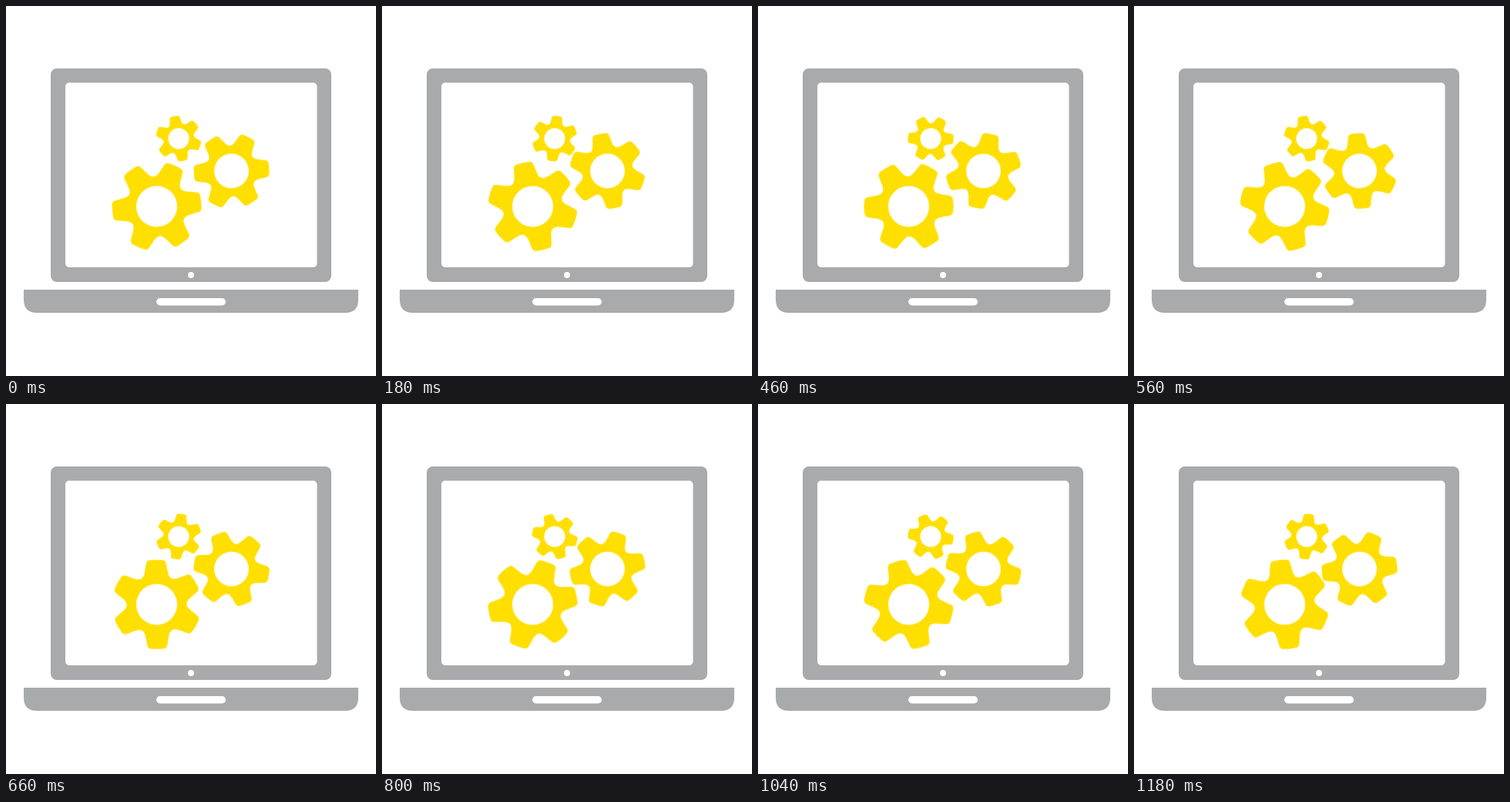
Animation of 480 by 480 pixels, one loop 1.2 s. Source, as an HTML page:

```html
<!DOCTYPE html>
<html lang="en">
<head>
<meta charset="utf-8">
<title>Laptop with turning gears</title>
<style>
  html, body { margin: 0; width: 100%; height: 100%; overflow: hidden; background: #fff; }
  svg { display: block; width: 100vw; height: 100vh; }
  .case { fill: #a8aaac; }
  .cut { fill: #fff; }
  .gear { fill: #ffdf00; animation: 1200ms linear infinite; }
  .large { animation-name: large; }
  .medium { animation-name: medium; }
  .small { animation-name: small; }

  @keyframes large {
    0% { transform: rotate(24deg); }
    15% { transform: rotate(47deg); }
    26.667% { transform: rotate(67.5deg); }
    38.333% { transform: rotate(88.5deg); }
    55% { transform: rotate(119deg); }
    76.667% { transform: rotate(156deg); }
    98.333%, 100% { transform: rotate(173.5deg); }
  }
  @keyframes medium {
    0% { transform: rotate(26.5deg); }
    15% { transform: rotate(-11deg); }
    26.667% { transform: rotate(-29deg); }
    38.333% { transform: rotate(-48.5deg); }
    55% { transform: rotate(-80.5deg); }
    76.667% { transform: rotate(-121deg); }
    98.333%, 100% { transform: rotate(-156deg); }
  }
  @keyframes small {
    0% { transform: rotate(-11deg); }
    15% { transform: rotate(6.5deg); }
    26.667% { transform: rotate(6deg); }
    38.333% { transform: rotate(31deg); }
    55% { transform: rotate(67deg); }
    76.667% { transform: rotate(133deg); }
    98.333%, 100% { transform: rotate(186deg); }
  }
</style>
</head>
<body>
<svg viewBox="0 0 480 480">
  <defs>
    <path id="tooth" d="M-19-33Q-15.5-37.5-14.9-42L-13-53Q-12.3-57-8-57.6Q0-58.2 8-57.6Q12.3-57 13-53L14.9-42Q15.5-37.5 19-33Z"/>
    <g id="gear">
      <circle r="32.75" fill="none" stroke="#ffdf00" stroke-width="12.5"/>
      <use href="#tooth"/>
      <use href="#tooth" transform="rotate(60)"/>
      <use href="#tooth" transform="rotate(120)"/>
      <use href="#tooth" transform="rotate(180)"/>
      <use href="#tooth" transform="rotate(240)"/>
      <use href="#tooth" transform="rotate(300)"/>
    </g>
  </defs>

  <rect class="case" x="58" y="81" width="364" height="277" rx="8"/>
  <rect class="cut" x="77" y="99.5" width="326.5" height="239.5" rx="5"/>
  <circle class="cut" cx="240" cy="349" r="4"/>
  <path class="case" d="M23 368H457V381Q457 398 440 398H40Q23 398 23 381Z"/>
  <rect class="cut" x="195" y="379" width="90" height="9.5" rx="4.75"/>

  <g transform="translate(195.5 260)"><g class="gear large"><use href="#gear"/></g></g>
  <g transform="translate(292.5 214) scale(.845)"><g class="gear medium"><use href="#gear"/></g></g>
  <g transform="translate(224 172) scale(.51)"><g class="gear small"><use href="#gear"/></g></g>
</svg>
</body>
</html>
```
